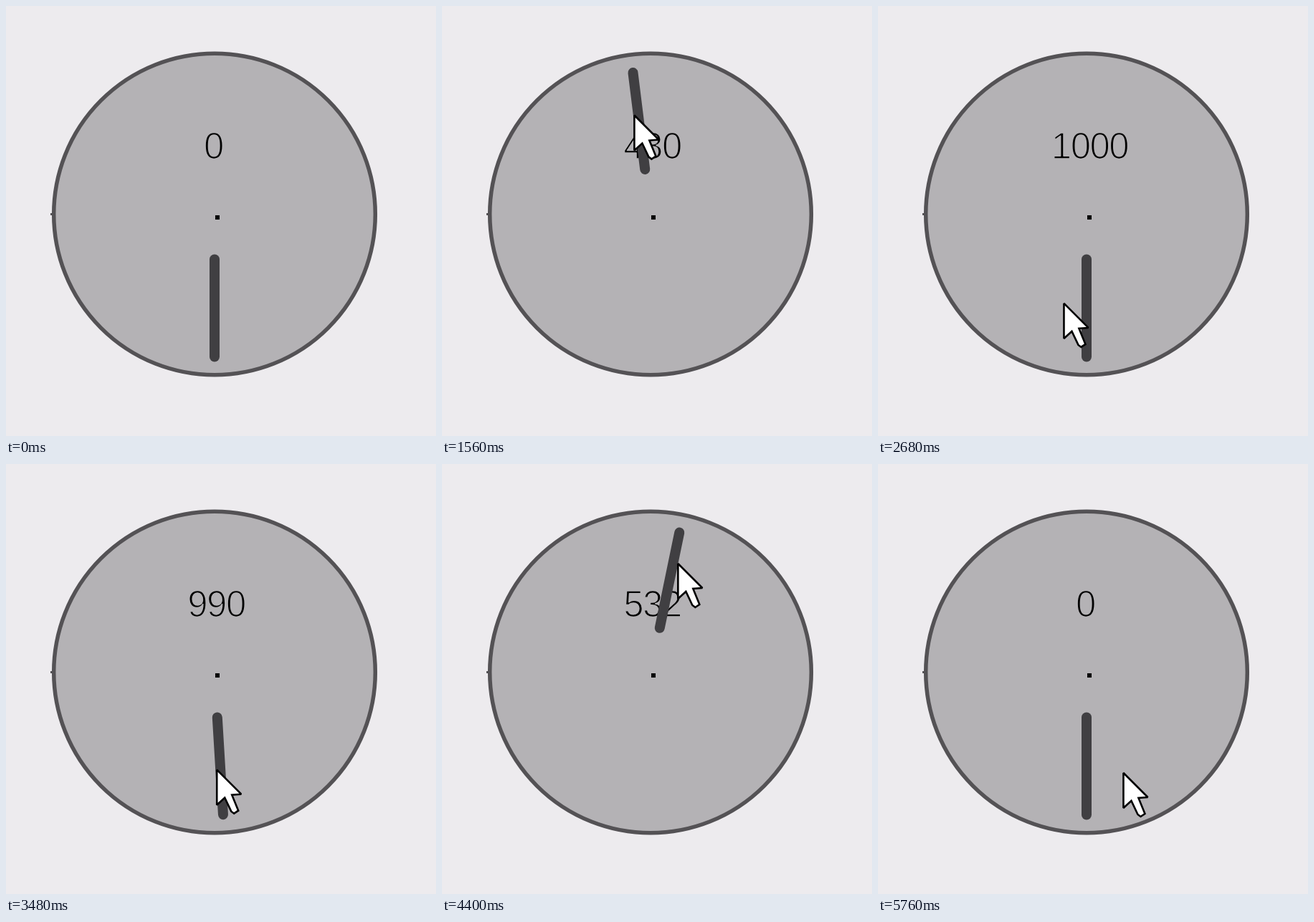
Recreate the animation shown at these times as an HTML page with a canvas. Size 600x600 px, loop 5.84 s.

```html
<!DOCTYPE html>
<html>
<head>
<meta charset="utf-8">
<title>Dial</title>
<style>
html, body { margin: 0; overflow: hidden; background: #edebee; }
canvas { display: block; }
</style>
</head>
<body>
<canvas id="stage" width="600" height="600"></canvas>
<script>
const ctx = document.getElementById('stage').getContext('2d');
const LOOP = 5840, STEP = 40, CX = 291, CY = 290.5;
const BACK = '#edebee', FACE = '#b4b2b5', RIM = '#545255', HAND = '#403f42';

// The pointer makes half turns between these stops (degrees clockwise from the bottom).
// lead: how early the turn runs; bulge: how far its arc swells outwards.
const stops = [
  { time: 520, angle: -2.3, radius: 175 },
  { time: 1680, angle: 178, radius: 142, lead: 0.088, bulge: -23 },
  { time: 2680, angle: 374.5, radius: 128, lead: 0.134, bulge: 20 },
  { time: 2840, angle: 374.5, radius: 128, lead: 0, bulge: 0 },
  { time: 3360, angle: 372, radius: 132, lead: 0, bulge: 0 },
  { time: 4560, angle: 176, radius: 156, lead: 0, bulge: 10 },
  { time: 5760, angle: -20, radius: 149, lead: 0, bulge: 10 }
];

const wave = x => Math.sin(Math.PI * x);
const lerp = (a, b, p) => a + (b - a) * p;
const ease = (u, lead) => u + lead * wave(u) - 0.056 * wave(2 * u);

function pointerAt(t) {
  const time = Math.min(t, 5760);
  const i = Math.max(1, stops.findIndex(s => s.time >= time));
  const from = stops[i - 1], to = stops[i];
  const p = ease((time - from.time) / (to.time - from.time), to.lead);
  return {
    angle: lerp(from.angle, to.angle, p),
    radius: lerp(from.radius, to.radius, p) + to.bulge * wave(p)
  };
}

function polar(degrees, radius) {
  const a = degrees * Math.PI / 180;
  return [CX - radius * Math.sin(a), CY + radius * Math.cos(a)];
}

function drawFace() {
  ctx.fillStyle = BACK;
  ctx.fillRect(0, 0, 600, 600);
  ctx.beginPath();
  ctx.arc(CX, CY, 224.3, 0, 2 * Math.PI);
  ctx.fillStyle = FACE;
  ctx.fill();
  ctx.strokeStyle = RIM;
  ctx.lineWidth = 5.5;
  ctx.stroke();
  ctx.fillStyle = RIM;
  ctx.fillRect(62, 289, 4, 3);
  ctx.fillStyle = '#000';
  ctx.fillRect(292, 292, 6, 6);
}

function drawValue(value) {
  const text = String(value), x = 287.5 + 2 * text.length;
  ctx.font = '51px "Liberation Sans", Arial, sans-serif';
  ctx.letterSpacing = '-1.5px';
  ctx.textAlign = 'center';
  ctx.fillStyle = '#000';
  ctx.fillText(text, x, 213);
  // Trim the outline to get a hairline weight
  ctx.strokeStyle = FACE;
  ctx.lineWidth = 1.7;
  ctx.lineJoin = 'round';
  ctx.strokeText(text, x, 213);
}

function drawHand(angle) {
  ctx.beginPath();
  ctx.moveTo(...polar(angle, 63));
  ctx.lineTo(...polar(angle, 199));
  ctx.strokeStyle = HAND;
  ctx.lineWidth = 14;
  ctx.lineCap = 'round';
  ctx.stroke();
}

function drawPointer([x, y]) {
  const arrow = [[0, 0], [0, 49], [11, 39], [20, 58], [24, 61], [30, 57], [21, 35], [34, 34]];
  ctx.beginPath();
  for (const [dx, dy] of arrow) ctx.lineTo(x + dx + 0.5, y + dy + 0.5);
  ctx.closePath();
  ctx.fillStyle = '#fff';
  ctx.fill();
  ctx.strokeStyle = '#000';
  ctx.lineWidth = 2.6;
  ctx.lineJoin = 'miter';
  ctx.miterLimit = 2;
  ctx.stroke();
}

function frame() {
  const t = Math.floor(performance.now() % LOOP / STEP) * STEP;
  const pointer = t >= stops[0].time ? pointerAt(t) : null;
  // The hand is grabbed slightly off its axis, on opposite sides for each direction
  const grip = t < 3000 ? 2.4 : -2.3;
  const angle = pointer ? Math.min(360, Math.max(0, pointer.angle + grip)) : 0;
  drawFace();
  drawValue(Math.round(angle / 0.36));
  drawHand(angle);
  if (pointer) drawPointer(polar(pointer.angle, pointer.radius));
  requestAnimationFrame(frame);
}
frame();
</script>
</body>
</html>
```
